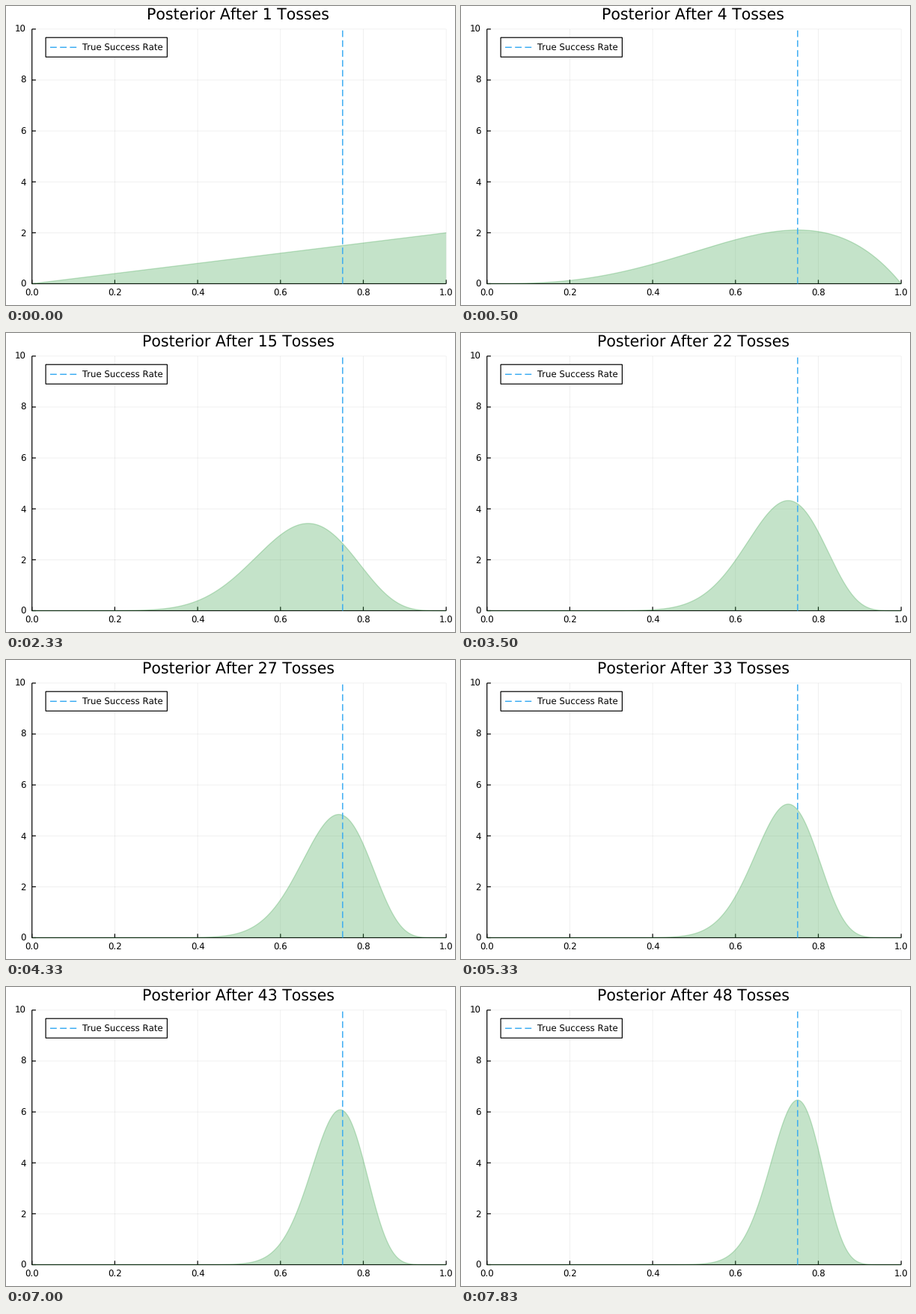
A matplotlib script that plays this animation: 600 by 400 pixels, repeating every 8 s.

```python
import math

import numpy as np
import matplotlib.pyplot as plt
from matplotlib.animation import FuncAnimation
from matplotlib.patches import Rectangle

plt.rcParams["font.family"] = "DejaVu Sans"
plt.rcParams["text.hinting"] = "none"
plt.rcParams["text.kerning_factor"] = 6  # plain advance widths, no kerning

W, H, DPI = 600, 400, 100
LEFT, RIGHT, TOP, BOTTOM = 34.7, 588.2, 30.9, 371.5
Y_MAX = 10
TRUE_RATE = 0.75
TOSSES = 48
LOOP_MS = 8000
TICK_MS = 40
TAILS = {2, 5, 9, 10, 13, 17, 27, 29, 33, 42, 43, 45}

GREEN = "#3da44d"
BLUE = "#38abf2"
PT = 72 / DPI  # points per pixel
UNIT = 22 / 15  # pixels per unit of line width

fig = plt.figure(figsize=(W / DPI, H / DPI), dpi=DPI, facecolor="white")
ax = fig.add_axes([0, 0, 1, 1])
ax.set_xlim(0, W)
ax.set_ylim(H, 0)
ax.axis("off")


def to_x(p):
    return LEFT + p * (RIGHT - LEFT)


def to_y(d):
    return BOTTOM - d / Y_MAX * (BOTTOM - TOP)


def line(xs, ys, width, color="black", **kw):
    kw.setdefault("solid_capstyle", "butt")
    return ax.plot(xs, ys, lw=width * PT, color=color, snap=False, **kw)[0]


def label(x, y, text, size=8 * UNIT, ha="center"):
    return ax.text(x, y, text, fontsize=size * PT, ha=ha, va="baseline", zorder=6)


def dashed(xs, ys):
    line(xs, ys, UNIT, BLUE, zorder=5, dashes=(6, 3), dash_capstyle="butt")


def draw_axes():
    for i in range(6):
        x, y = to_x(i / 5), to_y(2 * i)
        line([x, x], [TOP, BOTTOM], UNIT / 2, alpha=0.08, zorder=1)
        line([LEFT, RIGHT], [y, y], UNIT / 2, alpha=0.08, zorder=1)
        line([x, x], [BOTTOM, BOTTOM - 5.2], 1.2, zorder=2)
        line([LEFT, LEFT + 5.2], [y, y], 1.2, zorder=2)
        label(x, 387.6, f"{i / 5:.1f}")
        label(27, y + 4.3, str(2 * i), ha="right")
    line([LEFT, LEFT, RIGHT], [TOP, BOTTOM, BOTTOM], 1.2, zorder=2)


def draw_legend():
    ax.add_patch(Rectangle((53.1, 42.2), 162.3, 26, facecolor="white",
                           edgecolor="black", lw=1.2 * PT, zorder=4, snap=False))
    dashed([59, 96.5], [55.3, 55.3])
    label(101.5, 59.6, "True Success Rate", ha="left")


draw_axes()
draw_legend()
dashed([to_x(TRUE_RATE)] * 2, [BOTTOM, TOP])

grid = np.linspace(0, 1, 601)
px = to_x(grid)
fill = ax.fill(px, np.full_like(px, BOTTOM), color=GREEN, alpha=0.3, lw=0, zorder=3)[0]
edge = line(px, np.full_like(px, BOTTOM), 1.3, GREEN, alpha=0.3, zorder=3)
title = label(310.4, 18.9, "", size=14 * UNIT)


def posterior(n):
    """Beta density after n tosses with a flat prior."""
    tails = sum(t <= n for t in TAILS)
    heads = n - tails
    return (n + 1) * math.comb(n, tails) * grid**heads * (1 - grid)**tails


def update(tick):
    # a toss that falls within a tick shows from the start of that tick
    t = (tick + 0.9) * TICK_MS
    n = 1 + int(t * TOSSES / LOOP_MS)
    ys = to_y(posterior(n))
    outline = np.column_stack([px, ys])
    fill.set_xy(np.vstack([outline, [RIGHT, BOTTOM], [LEFT, BOTTOM]]))
    edge.set_ydata(ys)
    title.set_text(f"Posterior After {n} Tosses")
    return fill, edge, title


anim = FuncAnimation(fig, update, frames=LOOP_MS // TICK_MS,
                     init_func=lambda: update(0), interval=TICK_MS,
                     repeat=True, repeat_delay=0)
plt.show()
```
